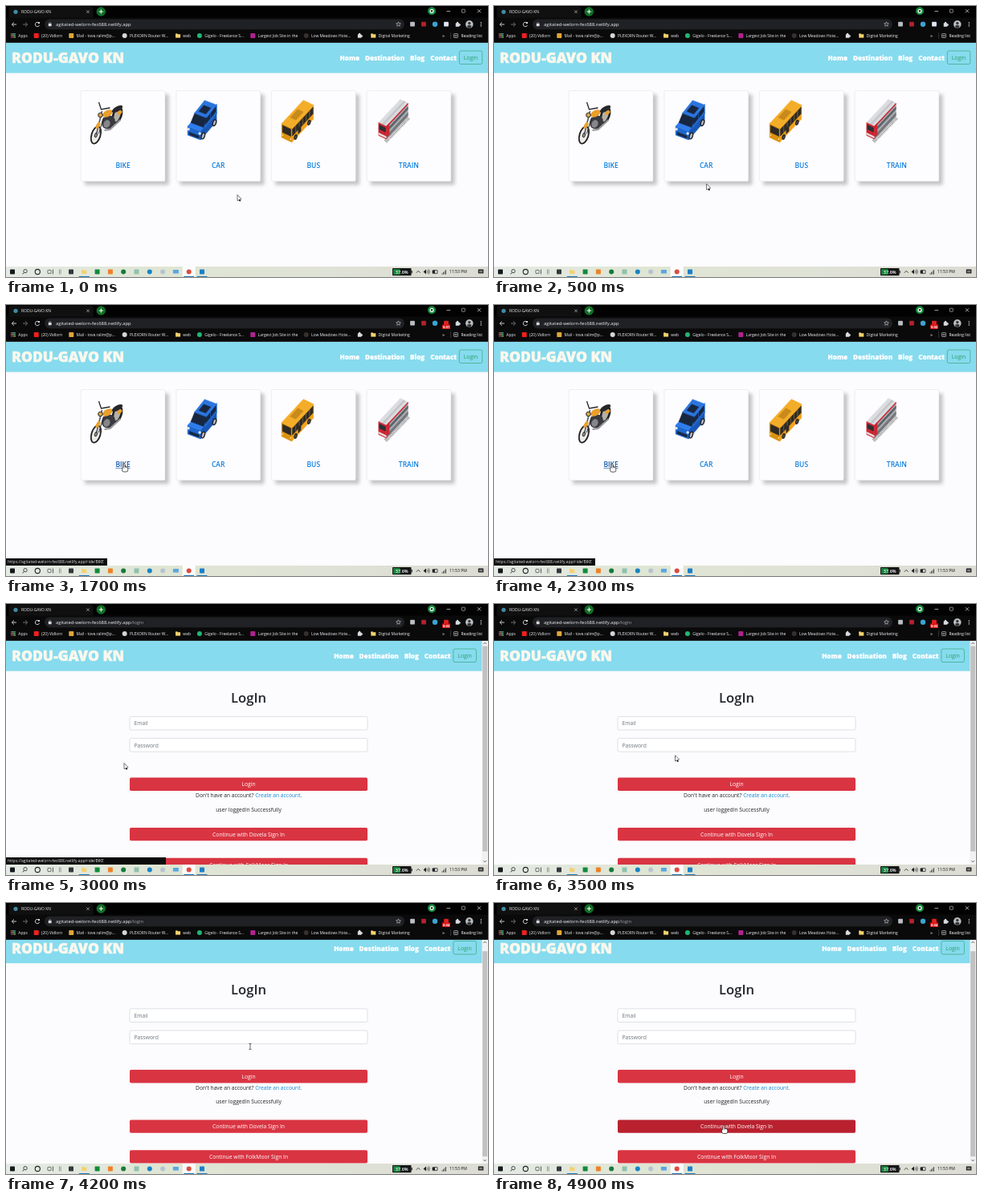
Animation of 600 by 338 pixels, one loop 5 s. Source, as an HTML page with a canvas:

```html
<!DOCTYPE html>
<html lang="en">
<head>
<meta charset="utf-8">
<title>Ride booking demo</title>
<style>
html, body { margin: 0; width: 100%; height: 100%; overflow: hidden; background: #fcfbfd; }
canvas { display: block; width: 600px; height: 338px; }
</style>
</head>
<body>
<canvas id="stage"></canvas>
<script>
const canvas = document.getElementById('stage');
const ratio = window.devicePixelRatio || 1;
canvas.width = 600 * ratio;
canvas.height = 338 * ratio;
const c = canvas.getContext('2d');

const LOOP = 5000, STEP = 100, LOGIN_AT = 2800, SCROLL_AT = 4050, MOVE_AT = 4300;
const BRAND = 'RODU-GAVO KN';
const HOST = 'agitated-welorn-fec688.netlify.app';
const PAGE_TOP = 45.6, PAGE_BOTTOM = 325;
const PALE = '#d9dbdf', INK = '#202326', LINK = '#0a7fe0', GREEN = '#28a06a', BODY = '#212529';

// where the pointer rests or turns: time, x, y
const POINTER = [
  [0, 288, 235.5], [1100, 236.5, 205.5], [1700, 147, 198], [3100, 147, 198.5],
  [3900, 304, 179], [MOVE_AT, 304, 179], [4800, 286, 277.5]
];

// ---------- drawing helpers ----------
function paint(fill, stroke, line = 0.6) {
  if (fill) { c.fillStyle = fill; c.fill(); }
  if (stroke) { c.strokeStyle = stroke; c.lineWidth = line; c.stroke(); }
}
function rect(x, y, w, h, fill) {
  c.fillStyle = fill;
  c.fillRect(x, y, w, h);
}
function box(x, y, w, h, r, fill, stroke, line) {
  c.beginPath();
  c.roundRect(x, y, w, h, r);
  paint(fill, stroke, line);
}
function square(x, y, size, fill, stroke) {
  box(x - size / 2, y - size / 2, size, size, size / 8, fill, stroke);
}
function oval(x, y, rx, ry, turn, fill, stroke, line) {
  c.beginPath();
  c.ellipse(x, y, rx, ry, turn, 0, Math.PI * 2);
  paint(fill, stroke, line);
}
function dot(x, y, r, fill, stroke, line) {
  oval(x, y, r, r, 0, fill, stroke, line);
}
function arc(x, y, r, from, to, color, line) {
  c.beginPath();
  c.arc(x, y, r, from, to);
  paint(null, color, line);
}
function trace(points) {
  c.beginPath();
  for (let i = 0; i < points.length; i += 2) c.lineTo(points[i], points[i + 1]);
}
function poly(points, fill, stroke, line) {
  trace(points);
  c.closePath();
  paint(fill, stroke, line);
}
function path(points, color, line) {
  trace(points);
  paint(null, color, line);
}
function cross(x, y, r, color, line) {
  path([x - r, y - r, x + r, y + r], color, line);
  path([x - r, y + r, x + r, y - r], color, line);
}
function chevron(x, y, w, h, color, line) {
  path([x - w, y + h, x, y, x + w, y + h], color, line);
}
function setFont(size, weight = 400) {
  c.font = `${weight} ${size}px "Open Sans", "Noto Sans", sans-serif`;
}
function text(str, x, y, size, color, align = 'left', weight = 400) {
  setFont(size, weight);
  c.textAlign = align;
  c.fillStyle = color;
  c.fillText(str, x, y);
  return c.measureText(str).width;
}
// extra heavy lettering: bold text with a thin outline
function heavy(str, x, y, size, color, align) {
  const width = text(str, x, y, size, color, align, 800);
  c.strokeStyle = color;
  c.lineWidth = size * 0.028;
  c.strokeText(str, x, y);
  return width;
}
function at(x, y, draw) {
  c.save();
  c.translate(x, y);
  draw();
  c.restore();
}
const mix = (a, b, k) => a + (b - a) * k;
const clamp = k => Math.min(1, Math.max(0, k));

// ---------- vehicles ----------
// An oblique block seen from its near bottom corner; u runs along it, w across, v up.
function block(x, y, lx, ly, wx, wy, h) {
  const point = (u, w, v) => [x + u * lx + w * wx, y + u * ly + w * wy - v * h];
  const quad = (a, b, d, e, fill) => poly([a, b, d, e].flat(), fill, fill, 0.5);
  return {
    point, quad,
    side: (u, u2, v, v2, fill) => quad(point(u, 0, v), point(u2, 0, v), point(u2, 0, v2), point(u, 0, v2), fill),
    front: (w, w2, v, v2, fill) => quad(point(0, w, v), point(0, w2, v), point(0, w2, v2), point(0, w, v2), fill),
    top: (u, u2, w, w2, fill) => quad(point(u, w, 1), point(u2, w, 1), point(u2, w2, 1), point(u, w2, 1), fill)
  };
}
function wheel(x, y, r, tyre, hub) {
  oval(x, y, r * 0.5, r, 0.3, hub, '#1f2023', tyre);
}
function bike() {
  const dark = '#26272b', amber = '#eba02a';
  wheel(34, 19, 10, 2.6, '#b5b0a8');
  wheel(7.5, 44, 11, 1.8, '#eeebe6');
  wheel(7.5, 44, 3, 1, '#999');
  oval(23, 28, 9, 8, -0.8, '#3a3a3e');
  oval(21, 30, 4, 5, 0.4, '#85868a');
  path([18, 38, 25, 37, 38, 25], '#97989c', 2.2);
  path([8, 43, 15, 14], '#55575c', 1.6);
  path([11, 42, 17, 22], dark, 1);
  oval(10, 32, 2.2, 4.5, 0.5, amber);
  oval(22, 17, 7, 4, -0.5, amber);
  oval(34, 11.5, 7.5, 3, -0.5, dark);
  oval(37, 16, 3.4, 2, -0.6, amber);
  dot(13, 19, 2.8, '#d9a648', dark, 1);
  path([11, 3, 14, 12, 25, 10], dark, 1.3);
}
function car() {
  const blue = '#1f66cc', glass = '#182740';
  const body = block(19, 50, 20, -23, -16, -6, 11);
  const cabin = block(24.5, 33, 13.5, -17, -14.5, -5.5, 9);
  body.side(0, 1, 0, 1, '#1a56b5');
  body.front(0, 1, 0, 1, blue);
  body.top(0, 1, 0, 1, '#2e7cec');
  cabin.side(0, 1.1, -0.3, 1, blue);
  cabin.side(0.05, 0.48, 0.15, 0.8, glass);
  cabin.side(0.56, 1, 0.15, 0.8, glass);
  cabin.quad(body.point(0.2, 0, 1), body.point(0.2, 1, 1), cabin.point(0.15, 1, 1), cabin.point(0.15, 0, 1), glass);
  cabin.top(0.1, 1.05, 0, 1, '#2b75de');
  cabin.top(0.3, 0.75, 0.2, 0.8, glass);
  body.front(0.12, 0.88, 0.12, 0.4, glass);
  for (const w of [0.06, 0.94]) dot(...body.point(0, w, 0.7), 1.7, '#dceaf7');
  for (const u of [0.16, 0.87]) wheel(...body.point(u, 0, 0.12), 4, 1.4, '#b4bac2');
}
function bus() {
  const glass = '#2d2a27', amber = '#f0a21c';
  const body = block(14, 53, 27, -29, -12.5, -6, 17.5);
  body.side(0, 1, 0, 1, amber);
  body.front(0, 1, 0, 1, '#dc920f');
  body.top(0, 1, 0, 1, '#f4ad28');
  body.top(0.3, 0.65, 0.25, 0.8, '#c98a1c');
  body.front(0.08, 0.92, 0.4, 0.9, glass);
  body.side(0.03, 0.98, 0.4, 0.88, glass);
  for (let u = 0.18; u < 1; u += 0.16) body.side(u, u + 0.01, 0.4, 0.88, '#7b6230');
  body.side(0.3, 0.42, 0.1, 0.5, glass);
  for (const u of [0.18, 0.8]) wheel(...body.point(u, 0, 0.08), 3, 1.2, '#55504a');
  for (const w of [0.1, 0.9]) dot(...body.point(0, w, 0.2), 0.8, '#fff2c5');
}
function train() {
  const red = '#cc2631';
  const body = block(13, 49, 27, -29, -9.5, -4.5, 16);
  c.setLineDash([1, 0.8]);
  path([12, 52, 41, 22], '#929292', 5);
  c.setLineDash([]);
  body.side(0, 1, 0, 1, '#a9acb0');
  body.side(0, 1, 0, 0.25, '#73767b');
  body.side(0.15, 1, 0.5, 0.7, '#5b6068');
  body.top(0, 1, 0, 1, '#dadcdf');
  body.top(0, 1, 0.35, 0.55, '#c3c5c9');
  body.side(0, 1, 0.88, 0.98, red);
  body.side(0, 0.14, 0.1, 0.98, red);
  body.front(0, 1, 0, 1, red);
  body.front(0.1, 0.9, 0.52, 0.85, '#2d3036');
  body.front(0, 1, 0.08, 0.2, '#e5e5e7');
}

const CARDS = [['BIKE', bike], ['CAR', car], ['BUS', bus], ['TRAIN', train]];

// ---------- pages ----------
function navbar(shift) {
  rect(0, PAGE_TOP, 600, 38, '#87dbee');
  heavy(BRAND, 7, 71, 17.6, '#fbf8ee');
  let right = 561 - shift;
  for (const label of ['Contact', 'Blog', 'Destination', 'Home'])
    right -= heavy(label, right, 68, 8.15, '#fff', 'right') + 6.9;
  box(564.3 - shift, 56, 28.5, 16.5, 2, null, GREEN);
  text('Login', 578.5 - shift, 67, 6.9, GREEN, 'center');
}
function homePage(hover) {
  navbar(0);
  CARDS.forEach(([label, draw], i) => {
    const x = 93.2 + i * 118.6, mid = x + 52.4;
    c.save();
    c.shadowColor = 'rgba(120,120,120,.42)';
    c.shadowOffsetX = c.shadowOffsetY = 4.8 * ratio;
    c.shadowBlur = 4 * ratio;
    box(x, 105.5, 104.8, 113, 1.5, '#fff');
    c.restore();
    box(x, 105.5, 104.8, 113, 1.5, '#fdfcfe', '#dedee1', 0.5);
    at(x + 11.3, 117, draw);
    const active = hover && i === 0;
    const color = active ? '#0a56a8' : LINK;
    const width = text(label, mid, 202.3, 8.5, color, 'center', 600);
    if (active) rect(mid - width / 2, 203.3, width, 0.6, color);
  });
}
function field(label, y) {
  box(154, y, 296, 16.6, 1.8, '#fff', '#c8ced5');
  text(label, 159.5, y + 11, 6.75, '#6c757d');
}
function button(label, y, hover) {
  box(154, y, 296, 16.4, 1.8, hover ? '#b9212f' : '#d93442');
  text(label, 302, y + 10.8, 6.75, '#fff', 'center');
}
function loginPage(scroll, px, py) {
  const over = y => px > 154 && px < 450 && py > y - scroll && py < y - scroll + 16.4;
  at(0, -scroll, () => {
    navbar(7.4);
    text('LogIn', 302, 122.5, 16.6, BODY, 'center', 600);
    field('Email', 140.4);
    field('Password', 167.6);
    button('Login', 216.6, over(216.6));
    text("Don't have an account? ", 236, 241, 6.7, BODY);
    text('Create an account.', 368.3, 241, 6.7, '#168bd4', 'right');
    text('user loggedIn Successfully', 302, 258.5, 6.7, BODY, 'center');
    button('Continue with Dovela Sign In', 278.9, over(278.9));
    button('Continue with FolkMoor Sign In', 316.7, over(316.7));
  });
  rect(592.5, PAGE_TOP, 7.5, 280, '#f1f1f1');
  rect(593.2, 52.5 + scroll * 0.9, 6, 256, '#c1c1c1');
  chevron(596.2, 48, 1.8, 2, '#555', 0.8);
  chevron(596.2, 322, 1.8, -2, '#555', 0.8);
}

// ---------- browser frame ----------
function folder(x, y) {
  rect(x - 3, y - 2.6, 2.6, 2, '#f6d26b');
  rect(x - 3, y - 1.8, 6, 4.4, '#f6d26b');
}
function puzzle(x, y) {
  square(x, y + 0.5, 4.6, PALE);
  dot(x, y - 2, 1.2, PALE);
  dot(x + 2.6, y + 0.5, 1.2, PALE);
}
function tabStrip() {
  rect(0, 0, 600, PAGE_TOP, '#020202');
  box(3.5, 1, 105, 15, 3, '#101011');
  rect(0, 14.5, 600, PAGE_TOP - 14.5, '#0a0a0b');
  dot(12, 7.3, 2.6, '#3f8ca3');
  text(BRAND, 19, 9.4, 4.95, '#f0f1f3');
  cross(102, 7.2, 1.8, PALE);
  dot(118.3, 7, 5.3, '#0d6b25', '#18993a');
  rect(115.6, 6.5, 5.4, 1, '#fff');
  rect(117.8, 4.3, 1, 5.4, '#fff');
  dot(530, 6.3, 5, '#168a3e');
  dot(530, 6.3, 2, '#0b3d1c', '#fff', 1.2);
  rect(548.5, 6.2, 4.6, 0.7, PALE);
  square(569.3, 6.2, 4, null, PALE);
  cross(589, 6.3, 2.1, '#eee', 0.7);
}
function toolbar(login, seconds) {
  at(10, 23, () => backArrow(PALE));
  at(24, 23, () => { c.scale(-1, 1); backArrow('#77797d'); });
  arc(39, 23, 2.7, 0.3, 5.4, PALE, 0.9);
  rect(39.8, 20, 2.2, 2, PALE);

  box(48, 16.4, 448, 12.8, 6.4, '#202124');
  rect(52.8, 22, 3.8, 3.2, PALE);
  arc(54.7, 21.8, 1.2, Math.PI, 0, PALE);
  const width = text(HOST, 62, 25, 5.9, '#eef0f2');
  if (login) text('/login', 62 + width, 25, 5.9, '#9aa0a6');
  const star = [];
  for (let i = 0; i < 10; i++) {
    const a = (i / 5 - 0.5) * Math.PI, r = i % 2 ? 1.4 : 3;
    star.push(488.5 + r * Math.cos(a), 22.8 + r * Math.sin(a));
  }
  poly(star, null, PALE);

  ['#b9bdc2', '#b3212c', '#3ba4cf', seconds ? '#e02020' : '#dfe6f2'].forEach((color, i) => {
    const x = 506 + i * 14;
    if (i === 2) dot(x, 22.8, 3.2, color);
    else square(x, 22.6, 5.8, color);
  });
  if (seconds) {
    box(543, 24.2, 10, 5.8, 1, '#e01414');
    text('0:0' + seconds, 548, 28.8, 4.2, '#fff', 'center', 700);
  }
  puzzle(562, 23);
  dot(576.8, 22.8, 4.8, '#b9bfc2');
  dot(576.8, 21.5, 1.7, '#39373a');
  oval(576.8, 25.6, 2.8, 1.8, 0, '#39373a');
  for (let i = 0; i < 3; i++) dot(591.3, 20.8 + i * 2.1, 0.7, PALE);
}
function backArrow(color) {
  path([3, 0, -2.6, 0], color, 0.9);
  path([0, -2.6, -2.7, 0, 0, 2.6], color, 0.9);
}
function appGrid(x, y) {
  for (let i = 0; i < 9; i++)
    rect(x - 3 + (i % 3) * 2.1, y - 3 + Math.floor(i / 3) * 2.1, 1.5, 1.5, `hsl(${i * 100}, 65%, 60%)`);
}
function shorten(label, limit) {
  const fits = s => c.measureText(s).width <= limit;
  if (fits(label)) return label;
  while (!fits(label + '...')) label = label.slice(0, -1);
  return label + '...';
}
const disc = color => (x, y) => dot(x, y, 3, color);
const tile = color => (x, y) => square(x, y, 6, color);
const BOOKMARKS = [
  [appGrid, 'Apps'], [tile('#f02020'), '(20) Vidlorn'], [tile('#e0a63a'), 'Mail - tove.ralim@postbox'],
  [disc('#d5d6d8'), 'PLEXORN Router Webpage'], [folder, 'web'], [disc('#21b573'), 'Gigelo - Freelance Services'],
  [tile('#b0238e'), 'Largest Job Site in the'], [disc('#36312c'), 'Low Meadows Hotel – Rooms'],
  [puzzle, ''], [folder, 'Digital Marketing']
];
function bookmarks() {
  let x = 9;
  for (const [icon, label] of BOOKMARKS) {
    icon(x, 37);
    setFont(4.95);
    const width = text(shorten(label, 50), x + 6.3, 39, 4.95, '#f0f1f3');
    x += label.length > 17 ? 66.4 : Math.max(14.5, width + 17.2);
  }
  text('»', 543, 39, 6, '#fff');
  rect(553, 33, 0.5, 8, '#55575b');
  square(560, 37, 5, null, PALE);
  for (let i = 0; i < 2; i++) rect(558.5, 36 + i * 1.6, 3, 0.6, PALE);
  text('Reading list', 566.5, 39, 4.95, '#fff');
}
function statusBubble(width) {
  rect(0, 316, width, 9, '#0b0b0c');
  text(`https://${HOST}/ride/BIKE`, 2, 322.2, 5, '#e6e6e6');
}

// ---------- taskbar ----------
const TASKS = [
  tile('#33383d'), folder, tile('#138a3c'), tile('#ee8226'), disc('#167a3c'), tile('#8fc2ae'),
  disc('#1884c4'), disc('#b8c3cf'), (x, y) => rect(x - 3.5, y - 2.5, 7, 4.6, '#5ba6e0'),
  disc('#dd4b3d'), tile('#1b80c8')
];
function taskbar() {
  const y = 331.5, shade = c.createLinearGradient(0, 0, 600, 0);
  ['#e4eae4', '#dfe5d3', '#dfe2d6', '#dcdcd4'].forEach((tone, i) => shade.addColorStop(i / 3, tone));
  rect(0, PAGE_BOTTOM, 600, 13, shade);
  square(8, y, 6, '#16191c');
  dot(24, y - 0.8, 2.2, null, INK, 0.8);
  path([22.4, y + 1, 20.6, y + 3], INK, 0.9);
  dot(39.3, y, 3.1, null, INK, 1.1);
  square(54, y, 4.2, null, INK);
  rect(58, 328.5, 0.7, 6, INK);
  for (const x of [66, 67.8]) rect(x, 328.5, 0.6, 6, '#666');
  TASKS.forEach((icon, i) => {
    const x = 81 + i * 16.3, active = i === 9;
    if (active) rect(x - 8, PAGE_BOTTOM, 16, 13, '#fbfcfc');
    icon(x, y);
    if (i === 1 || i >= 9) rect(x - 6.5, 337, 13, 1, '#1f78b8');
  });

  box(481, 327, 23.5, 9.2, 0.8, '#151617');
  rect(482, 328, 8.5, 7.2, '#12823a');
  rect(504.5, 330, 1.2, 3.4, '#151617');
  text('37.6%', 492.7, 333.8, 5.6, '#fff', 'center', 600);
  chevron(513.2, 330.3, 2.4, 2.5, INK, 0.8);
  poly([519.5, y, 523, y - 3, 523, y + 3], INK);
  for (let r = 1.5; r < 5; r += 1.5) arc(522.8, y, r, -0.8, 0.8, INK);
  box(531, 329.6, 6, 4, 0.4, null, INK, 0.8);
  rect(531, 330, 3, 3.2, INK);
  for (let i = 0; i < 4; i++) rect(542.5 + i * 1.5, 333.3 - i * 1.4, 1, 1.4 + i * 1.4, '#555');
  text('11:53 PM', 552, 333.4, 5.05, '#111');
  box(587.8, 328.4, 6.6, 5.2, 0.4, INK);
  for (let i = 0; i < 2; i++) rect(589, 330 + i * 1.6, 4.2, 0.6, '#dcdcd4');
}

// ---------- pointer ----------
function arrow() {
  path([2, 4.5, 3.5, 8], '#111', 1.8);
  poly([0, 0, 0, 7.2, 5, 5.2], '#fff', '#111');
}
function hand() {
  box(-2.4, 4, 7.2, 6, 2, '#fff', '#111', 0.7);
  box(-0.9, -0.4, 1.9, 6, 0.9, '#fff', '#111', 0.6);
  rect(-0.5, 4, 1.1, 3, '#fff');
}
function beam() {
  rect(-0.35, -3.4, 0.7, 6.8, '#222');
  for (const y of [-3.7, 3.1]) rect(-1.6, y, 3.2, 0.6, '#222');
}
function pointerAt(t) {
  const next = POINTER.findIndex(stop => stop[0] > t);
  const b = POINTER.at(next), a = next > 0 ? POINTER[next - 1] : b;
  const k = a === b ? 0 : (t - a[0]) / (b[0] - a[0]);
  return [mix(a[1], b[1], k), mix(a[2], b[2], k)];
}
function loginPointer(x, y) {
  if (x < 154 || x > 450) return arrow;
  const within = (top, h = 16.5) => y > top && y < top + h;
  if (within(216.6) || within(278.9)) return hand;
  if (within(140.4) || within(167.6)) return beam;
  return x > 236 && (within(235, 8) || within(252, 8)) ? beam : arrow;
}

// ---------- playback ----------
function render(t) {
  const login = t >= LOGIN_AT;
  const [x, y] = pointerAt(t);
  const linkHover = !login && x < 156 && y < 205;
  const scroll = 8.5 * clamp((t - SCROLL_AT) / 100);

  c.setTransform(ratio, 0, 0, ratio, 0, 0);
  rect(0, 0, 600, 338, '#fcfbfd');
  if (login) loginPage(scroll, x, y);
  else homePage(linkHover);
  tabStrip();
  toolbar(login, Math.floor(t / 1000));
  bookmarks();
  if (linkHover) statusBubble(126);
  else if (login && t < 3200) statusBubble(199);
  taskbar();
  // the shape only refreshes once the pointer moves again after the scroll
  const shape = login ? loginPointer(x, y + (t > MOVE_AT ? scroll : 0)) : linkHover ? hand : arrow;
  at(x, y, shape);
}
function tick() {
  const t = performance.now() % LOOP;
  render(Math.floor(t / STEP) * STEP);
  requestAnimationFrame(tick);
}
tick();
</script>
</body>
</html>
```
